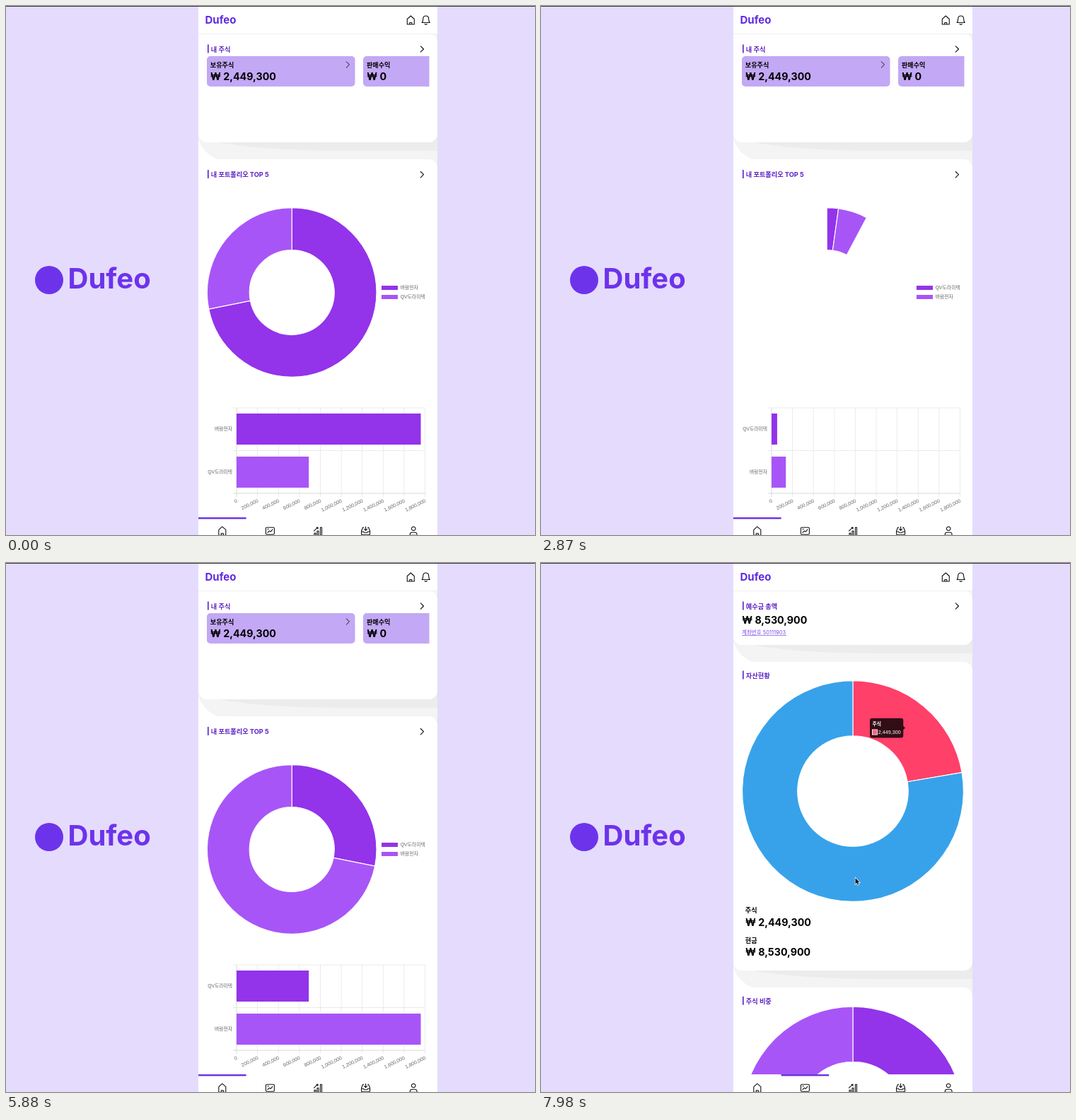
Write an HTML page with a canvas that moves like this. It is 748 by 749 pixels and loops after 8000 ms.

```html
<!DOCTYPE html>
<html lang="ko">
<head>
<meta charset="utf-8">
<title>Dufeo</title>
<style>
  html, body { margin: 0; width: 100%; height: 100%; overflow: hidden; background: #e5dbfd; }
  canvas { display: block; width: 748px; height: 749px; }
</style>
</head>
<body>
<canvas id="stage" width="748" height="749"></canvas>
<script>
const c = document.getElementById('stage').getContext('2d');
const UI = 'Inter, "Noto Sans CJK KR", sans-serif';
const CHART = '"Liberation Sans", "Noto Sans CJK KR", sans-serif';
const BRAND = 'Dufeo', DARK = '#9333ea', LIGHT = '#a855f7', ACCENT = '#6a32e6';
const STOCKS = [['벼람전자', 1759500], ['QV도라미텍', 689800]];
const LOOP = 8000, STEP = 70;
const LEFT = 272, RIGHT = 610, WIDTH = RIGHT - LEFT;

const clamp = v => Math.max(0, Math.min(1, v));
const ease = v => 1 - (1 - clamp(v)) ** 4;
const mix = (a, b, k) => a + (b - a) * k;

function rect(x, y, w, h, color) {
  c.fillStyle = color;
  c.fillRect(x, y, w, h);
}

function round(x, y, w, h, r, color) {
  c.fillStyle = color;
  c.beginPath();
  c.roundRect(x, y, w, h, r);
  c.fill();
}

function text(str, x, y, size, color = '#000', weight = 700, family = UI, align = 'left') {
  c.font = `${weight} ${size}px ${family}`;
  c.fillStyle = color;
  c.textAlign = align;
  c.fillText(str, x, y);
}

const amount = (str, x, y) => text(str, x, y, 14.25);

function stroke(d, x, y, color = '#111', width = 1.1) {
  c.save();
  c.translate(x, y);
  c.strokeStyle = color;
  c.lineWidth = width;
  c.lineCap = c.lineJoin = 'round';
  c.stroke(new Path2D(d));
  c.restore();
}

const ICONS = {
  home: 'M-5 -1.5L0 -6L5 -1.5V6H-5Z M-1.5 6V3.5H1.5V6',
  board: 'M-4.5 -5H4.5Q6 -5 6 -3.5V3.5Q6 5 4.5 5H-4.5Q-6 5 -6 3.5V-3.5Q-6 -5 -4.5 -5Z M-3.5 2.5L-1 0L.8 1.2L3.5 -2 M-3.5 -2.5H-2',
  bars: 'M-5 6V3H-3V6Z M-1 6V0H1V6Z M3.5 6V-5H5.5V6Z M-5.5 0L0 -5M-2 -5H0V-3',
  inbox: 'M-3 -5H-4L-6 0V4Q-6 5.5 -4.5 5.5H4.5Q6 5.5 6 4V0L4 -5H3 M-6 1H-3L-2 2.5H2L3 1H6 M0 -6V-.5M-2 -2.5L0 -.5L2 -2.5',
  person: 'M0 -6A2.8 2.8 0 1 1 0 -.4A2.8 2.8 0 1 1 0 -6 M-5 6Q-5 2 -2 2H2Q5 2 5 6Z',
  bell: 'M-5.5 3.5Q-4 2 -4 -1.5Q-4 -6 0 -6Q4 -6 4 -1.5Q4 2 5.5 3.5Z M-1.5 5.5Q0 7 1.5 5.5',
  chevron: 'M-2.2 -4.2L2 0L-2.2 4.2'
};

function card(top, bottom, last) {
  // stepped soft shadow, then the white sheet
  const band = (l, r, up, down, rad, color) =>
    round(l, top + up, r - l, bottom + down - top - up, rad, color);
  band(270, 650, -3, 27, 45, '#f4f4f4');
  if (last) {
    band(280, 642, 5, 17, 40, '#ebebeb');
    band(291, 613, 10, 7, 30, '#e1e1e1');
  } else {
    band(285, 700, 5, 12, [0, 0, 0, { x: 200, y: 20 }], '#ececec');
  }
  round(LEFT, top, WIDTH, bottom - top, 12, '#fff');
}

function heading(str, y) {
  rect(285, y - 10, 1.6, 12, '#5b21c6');
  text(str, 289.8, y, 9.2, '#5b21c6');
}

function donut(x, y, outer, inner, slices, p) {
  const total = slices.reduce((s, v) => s + v[0], 0);
  let from = -Math.PI / 2;
  if (p <= 0) return;
  for (const [value, color] of slices) {
    const to = from + value / total * Math.PI * 2 * p;
    c.beginPath();
    c.arc(x, y, outer, from, to);
    c.arc(x, y, inner, to, from, true);
    c.closePath();
    c.fillStyle = color;
    c.fill();
    c.strokeStyle = '#fff';
    c.lineWidth = 1.1;
    c.stroke();
    from = to;
  }
}

function barChart(stocks, p, hover) {
  const x0 = 326, span = 266.5, gap = span / 9, grid = '#e6e6e6';
  for (let i = 0; i <= 9; i++) {
    const x = x0 + i * gap;
    rect(x - .4, 569, .8, 126, i ? grid : '#cfcfcf');
    c.save();
    c.translate(x + .5, 700);
    c.rotate(-.45);
    text((i * 200000).toLocaleString('en-US'), 0, 2.5, 7.1, '#666', 400, CHART, 'right');
    c.restore();
  }
  [569, 629.5, 690].forEach((y, i) => rect(321, y - .4, span + 5, .8, i == 2 ? '#cfcfcf' : grid));
  stocks.forEach(([name, value], i) => {
    const y = 577 + i * 61;
    text(name, 320, y + 24, 6.8, '#666', 400, CHART, 'right');
    rect(x0, y, value / 1800000 * span * p, 44, i ? (hover ? '#9a35fb' : LIGHT) : DARK);
  });
}

function homePage(loading, stocks, p, hover) {
  c.save();
  if (loading) c.translate(0, 23.5);
  card(39, 193);
  heading('내 주식', 64.5);
  stroke(ICONS.chevron, 588.5, 61);
  round(284, 71, 209.5, 43, 5, '#c3a8f5');
  round(505, 71, 93.5, 43, [5, 0, 0, 5], '#c3a8f5');
  text('보유주식', 288.8, 86.5, 9.1);
  amount('₩ 2,449,300', 289, 104.5);
  stroke(ICONS.chevron, 483.5, 83, '#111', 1);
  text('판매수익', 510, 86.5, 9.1);
  amount('₩ 0', 510.3, 104.5);
  card(217, loading ? 439 : 800, loading);
  heading('내 포트폴리오 TOP 5', 242);
  stroke(ICONS.chevron, 588.5, 238.7);
  if (!loading) {
    const colors = [DARK, LIGHT];
    donut(404.2, 405.5, 119.8, 60, stocks.map((s, i) => [s[1], colors[i]]), p);
    stocks.forEach(([name], i) => {
      rect(531, 396 + i * 13, 23, 6, colors[i]);
      text(name, 557.8, 401.3 + i * 13, 6.8, '#666', 400, CHART);
    });
    barChart(stocks, p, hover);
  }
  c.restore();
}

function assetPage(loading, p) {
  const cut = loading ? -237 : 0;
  c.save();
  if (loading) c.translate(0, 23.5);
  card(39, 116);
  heading('예수금 총액', 64.5);
  stroke(ICONS.chevron, 588.5, 61);
  amount('₩ 8,530,900', 284.2, 85.5);
  text('계좌번호 50111903', 284, 101, 7.5, '#7c4ae6', 400);
  rect(284, 102, 63, .7, '#7c4ae6');
  card(140, 577 + cut);
  heading('자산현황', 162.5);
  donut(441, 323, 156.4, 78.3, [[2449300, '#ff4069'], [8530900, '#37a2ea']], p);
  text('주식', 288.8, 495.3 + cut, 9.1);
  amount('₩ 2,449,300', 289, 513.5 + cut);
  text('현금', 288.8, 538 + cut, 9.1);
  amount('₩ 8,530,900', 289, 556 + cut);
  card(601 + cut, loading ? 478 : 980, loading);
  heading('주식 비중', 623.7 + cut);
  donut(441, 784.5, 156.4, 78.3, STOCKS.map((s, i) => [s[1], i ? LIGHT : DARK]), p);
  c.restore();
}

function tooltip(x, y, alpha) {
  c.save();
  c.globalAlpha = alpha;
  c.translate(x, y);
  c.fillStyle = 'rgba(0,0,0,.8)';
  c.beginPath();
  c.roundRect(-50, -13.7, 47.3, 27.6, 3);
  c.moveTo(-2.7, -2.7);
  c.lineTo(0, 0);
  c.lineTo(-2.7, 2.7);
  c.fill();
  text('주식', -46.6, -4, 6.8, '#fff', 700, CHART);
  rect(-47, 2, 8, 8, '#fff');
  rect(-46.2, 2.8, 6.4, 6.4, '#ff6384');
  text('2,449,300', -38.2, 8.3, 7.2, '#fff', 400, CHART);
  c.restore();
}

function cursor(x, y) {
  c.save();
  c.translate(x, y);
  const arrow = new Path2D('M0 0V8.5L2 6.7L3.4 9.8L4.8 9.2L3.4 6.2H6Z');
  c.strokeStyle = '#fff';
  c.lineWidth = 1.4;
  c.stroke(arrow);
  c.fillStyle = '#111';
  c.fill(arrow);
  c.restore();
}

function frame(icons, tab) {
  rect(LEFT, 0, WIDTH, 39, '#fff');
  rect(LEFT, 39, WIDTH, .8, '#eee');
  text(BRAND, 281.5, 25, 15, '#5f2be0');
  if (icons) {
    stroke(ICONS.home, 572.3, 20);
    stroke(ICONS.bell, 593.7, 20);
  }
  rect(LEFT, 724, WIDTH, 25, '#fff');
  rect(LEFT + tab * 67.6, 724, 67.6, 2.4, ACCENT);
  ['home', 'board', 'bars', 'inbox', 'person'].forEach((name, i) =>
    stroke(ICONS[name], 305.8 + i * 67.6, 743.2));
}

function draw(t) {
  rect(0, 0, 748, 749, '#e5dbfd');
  c.fillStyle = '#6d33eb';
  c.beginPath();
  c.arc(61, 388, 20, 0, Math.PI * 2);
  c.fill();
  text(BRAND, 87.5, 399.5, 40, '#6d33eb');

  const assets = t >= 6090;
  const loading = t >= 1120 && t < 1820 || t >= 2800 && t < 2850 || assets && t < 6510;
  c.save();
  c.beginPath();
  c.rect(LEFT, 0, WIDTH, 749);
  c.clip();
  rect(LEFT, 0, WIDTH, 749, '#fff');
  if (assets) {
    assetPage(loading, ease((t - 6530) / 1000));
  } else if (t < 2800) {
    // the chart stalls before it has finished opening
    homePage(loading, STOCKS, t < 1120 ? 1 : ease((Math.min(t, 2170) - 1815) / 1000));
  } else {
    homePage(loading, [...STOCKS].reverse(), ease((t - 2850) / 1000), t >= 5320 && t < 5530);
  }
  frame(!loading, assets ? 1 : 0);
  if (t > 6660) {
    const k = ease((t - 6790) / 400);
    tooltip(mix(477.5, 515, k), mix(213, 233.5, k), clamp((t - 6660) / 120));
  }
  if (t >= 5320 && t < 5880) {
    const k = clamp((t - 5320) / 490);
    cursor(mix(470, 482, k), mix(665, 84, k * k * (3 - 2 * k)));
  }
  if (t >= 7770) {
    const k = ease((t - 7770) / 210);
    cursor(mix(490, 444.5, k), mix(260, 446, k));
  }
  c.restore();
  rect(0, 0, 748, 1, '#3c3a42');
}

const start = performance.now();
function tick() {
  const t = (performance.now() - start) % LOOP;
  draw(Math.floor(t / STEP) * STEP);
  requestAnimationFrame(tick);
}
tick();
</script>
</body>
</html>
```
